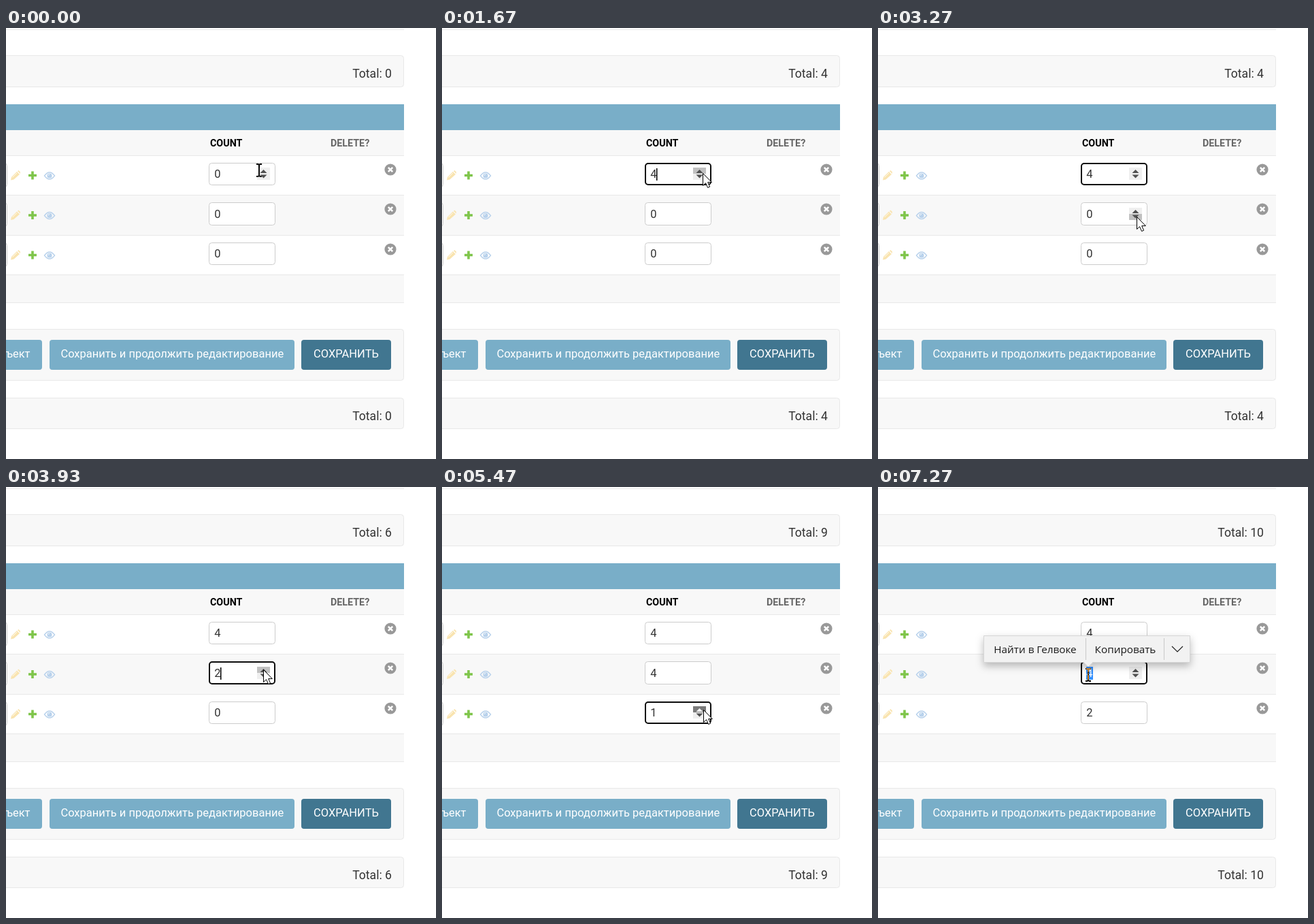
These frames come from a looping animation (632 by 633 pixels, 8000 ms). An HTML page:

```html
<!DOCTYPE html>
<html lang="ru">
<meta charset="utf-8">
<title>Total counter</title>
<style>
  html, body { margin: 0; height: 100%; overflow: hidden; background: #fff }
  svg { display: block; width: 632px; height: 633px; font-family: Roboto, sans-serif }
  .panel { fill: #f8f8f8; stroke: #e8e8e8 }
  .line { stroke: #e8e8e8 }
  .head { font-size: 14.3px; font-weight: 700 }
  .btn { font-size: 16.5px; fill: #fff }
  .total { font-size: 17.6px; fill: #333; text-anchor: end }
  .value { font-size: 16.5px; fill: #333 }
  .field { fill: #fff; stroke: #ccc }
  .focus { fill: #fff; stroke: #0c0c0c; stroke-width: 2 }
  .popup { font: 15.3px "Open Sans", sans-serif; fill: #1a1a1a }
  .ibeam { mix-blend-mode: difference; fill: none; stroke: #fff; stroke-width: 2 }
</style>
<svg viewBox="0 0 632 633">
  <rect width="632" height="633" fill="#fff"/>
  <g id="page"></g>
  <g id="live"></g>
  <g id="popup" class="popup">
    <g style="filter: drop-shadow(0 5px 6px #0004)">
      <path d="M155.5 218.5H458.5V257.5H316L309 264L302 257.5H155.5Z" fill="#f2f2f2" stroke="#d6d6d6"/>
    </g>
    <path d="M305.5 222V254M420.5 222V254" stroke="#c9c9c9"/>
    <path d="M432 234l8 8l8-8" fill="none" stroke="#222" stroke-width="1.2"/>
    <text x="231" y="244" text-anchor="middle">Найти в Гелвоке</text>
    <text x="363.5" y="244" text-anchor="middle">Копировать</text>
  </g>
  <path id="ibeam" class="ibeam" d="M-4-9H-1.5L0-8L1.5-9H4M0-8V8M-4 9H-1.5L0 8L1.5 9H4"/>
  <path id="arrow" d="M.5 .5V18.5L4.6 14.7L7.6 21.5L10.6 20.2L7.7 13.6H13.4Z" fill="#fff" stroke="#000"/>
</svg>
<script>
const $ = id => document.getElementById(id);
const rows = [0, 1, 2].map(i => {
  const top = Math.round(197.9 + 58.5 * i), bottom = Math.round(231 + 58.5 * i);
  return { top, bottom, mid: Math.floor((top + bottom) / 2) };
});

// [press time, release time, row]; each press adds one
const presses = [
  [600, 730, 0], [1130, 1200, 0], [1330, 1470, 0], [1530, 1670, 0],
  [3600, 3730, 1], [3930, 3930, 1], [4070, 4130, 1], [4270, 4400, 1],
  [5470, 5600, 2], [5730, 5800, 2]
];
const DRAG = 6800, SELECT = 6930, POPUP = 7060;

// [time, x, y] of the pointer
const path = [
  [0, 372, 209], [133, 383, 213], [2000, 383, 213], [2600, 387, 277],
  [2733, 388, 279], [2800, 388, 279], [3133, 381, 281], [3200, 381, 281],
  [3400, 378, 268], [4600, 378, 268], [5070, 386, 338], [5333, 384, 327],
  [5933, 384, 327], [6390, 335, 268], [6533, 333, 269], [6600, 333, 269],
  [7000, 309, 276], [8000, 309, 276]
];

const rect = (x, y, w, h, attrs) => `<rect x="${x}" y="${y}" width="${w}" height="${h}" ${attrs}/>`;
const text = (x, y, cls, str, attrs = '') => `<text x="${x}" y="${y}" class="${cls}" ${attrs}>${str}</text>`;
const line = y => `<path class="line" d="M0 ${y}.5H585"/>`;
const panel = (y, h) => rect(-9.5, y + .5, 594, h, 'rx="4" class="panel"');

function drawPage() {
  const icons = rows.map(({ top }, i) => {
    const y = 216.5 + 58.5 * i;
    return rect(-50, top + .5, 51.5, 35, 'rx="4" class="field"') + `
      <g transform="translate(14 ${y})" fill="#f9e4b0">
        <path d="M-7 7L-6 2.5L2-5.5L6-1.5L-2.5 6Z M3-6.3L4.5-7.5L7-5L6.8-2.5Z"/>
        <path d="M-4.5 3L2-3.5" stroke="#fff" stroke-width=".8"/>
      </g>
      <path d="M39 ${y - 6}v12M33 ${y}h12" stroke="#7fc54b" stroke-width="3.6"/>
      <g transform="translate(64 ${y + .5})" fill="none" stroke="#b9d2ec" stroke-width="1.4">
        <path d="M-7.5 0Q0-10 7.5 0Q0 10-7.5 0Z"/>
        <circle r="3.6" fill="#b9d2ec" stroke="none"/>
        <path d="M-1.8-.3Q-1.6-1.8 0-2" stroke="#fff" stroke-width="1"/>
      </g>
      <g transform="translate(565 ${top + 10})">
        <circle r="8.6" fill="#999"/>
        <path d="M-3.2-3.2L3.2 3.2M3.2-3.2L-3.2 3.2" stroke="#fff" stroke-width="2.6"/>
      </g>`;
  }).join('');
  $('page').innerHTML =
    line(2) + panel(40, 46) +
    rect(0, 112, 585, 38, 'fill="#79aec8"') +
    rect(0, 150, 585, 37, 'fill="#f8f8f8"') +
    rect(0, 246, 585, 58, 'fill="#f8f8f8"') +
    rect(0, 363, 585, 40, 'fill="#f8f8f8"') +
    [187, 245, 304, 362, 403].map(line).join('') +
    text(300, 174, 'head', 'COUNT') + text(477, 174, 'head', 'DELETE?', 'fill="#666"') +
    icons + panel(442, 75) + panel(543, 45) +
    rect(-40, 458, 93, 44, 'rx="4" fill="#79aec8"') +
    rect(64, 458, 360, 44, 'rx="4" fill="#79aec8"') +
    rect(434, 458, 132, 44, 'rx="4" fill="#417690"') +
    text(35.5, 484, 'btn', 'Сохранить и добавить другой объект', 'text-anchor="end"') +
    text(244.3, 484, 'btn', 'Сохранить и продолжить редактирование', 'text-anchor="middle"') +
    text(500, 484, 'btn', 'СОХРАНИТЬ', 'text-anchor="middle"');
}

function pointerAt(t) {
  const i = path.findIndex(p => p[0] > t);
  const [t0, x0, y0] = path[i - 1], [t1, x1, y1] = path[i];
  const k = (t - t0) / (t1 - t0);
  return [Math.round(x0 + (x1 - x0) * k), Math.round(y0 + (y1 - y0) * k)];
}

function spinner(mid, half, pressed) {
  const dark = '#505050', upFill = pressed ? '#f4f4f4' : dark;
  return rect(369, mid - 9, 19, 18, 'fill="#efefef"') +
    (half ? rect(369, half < 0 ? mid - 9 : mid, 19, 9, `fill="${pressed ? '#7b7b7b' : '#c1c1c1'}"`) : '') +
    `<path d="M373.5 ${mid - 1}h10l-5-5z" fill="${upFill}"/>` +
    `<path d="M373.5 ${mid + 1.5}h10l-5 5z" fill="${dark}"/>`;
}

function draw(t) {
  const [x, y] = pointerAt(t);
  const done = presses.filter(p => p[0] <= t + 5);
  const last = done[done.length - 1];
  const pressed = last && t + 5 < last[1];
  const dragging = t >= DRAG, selected = t >= SELECT;
  const focus = dragging ? 1 : last ? last[2] : -1;
  const since = t - (dragging ? DRAG : last ? last[0] : 0);
  const caretOn = Math.floor((since + 3) / 530) % 2 === 0;
  const hover = rows.findIndex(r => x >= 298 && x < 396 && y >= r.top && y < r.bottom);
  const ibeam = hover >= 0 && x < 372.5;

  const fields = rows.map(({ top, bottom, mid }, i) => {
    const focused = i === focus, marked = focused && selected;
    const inset = focused ? 1 : .5;
    const half = i === hover && !ibeam && x <= 388 ? (y < mid ? -1 : 1) : 0;
    const count = done.filter(p => p[2] === i).length;
    return rect(298 + inset, top + inset, 98 - 2 * inset, bottom - top - 2 * inset,
        `rx="4" class="${focused ? 'focus' : 'field'}"`) +
      (marked ? rect(306, mid - 9, 10, 19, 'fill="#3390ff"') : '') +
      text(306.3, mid + 6, 'value', count, marked ? 'style="fill:#fff"' : '') +
      (focused && caretOn && !marked ? rect(315, mid - 8, 1.5, 18, 'fill="#000"') : '') +
      (focused || i === hover ? spinner(mid, half, pressed && focused) : '');
  }).join('');

  $('live').innerHTML = fields +
    [73, 576].map(base => text(567, base, 'total', 'Total: ' + done.length)).join('');
  $('popup').setAttribute('opacity', Math.max(0, Math.min(1, (t - POPUP) / 200)));
  for (const [id, on] of [['ibeam', ibeam], ['arrow', !ibeam]]) {
    $(id).setAttribute('transform', `translate(${x} ${y})`);
    $(id).setAttribute('visibility', on ? 'visible' : 'hidden');
  }
}

let shown = -1;
function tick() {
  const step = Math.floor((performance.now() % 8000) * .015 + .06) % 120;
  if (step !== shown) draw((shown = step) / .015);
  requestAnimationFrame(tick);
}
drawPage();
tick();
</script>
</html>
```
